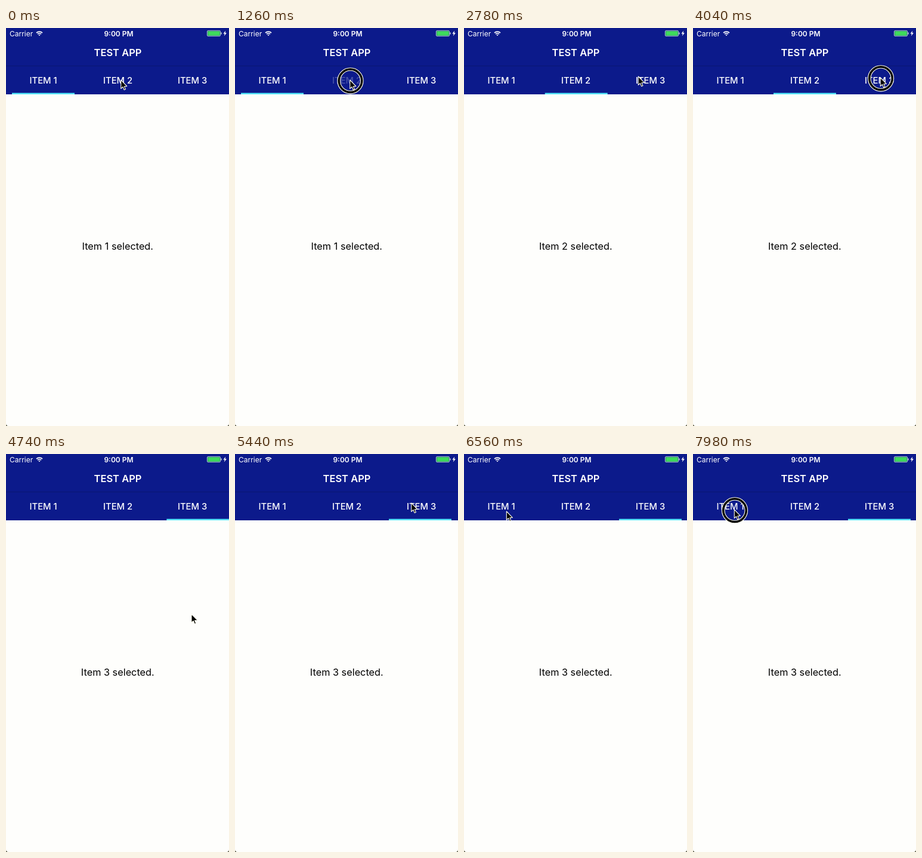
These frames come from a looping animation (374x666 px, 8 s). An HTML page with a canvas:

```html
<!DOCTYPE html>
<html lang="en">
<head>
<meta charset="utf-8">
<title>Tab bar</title>
<style>
html, body { margin: 0; width: 100%; height: 100%; overflow: hidden; background: #fefefc; }
canvas { display: block; }
</style>
</head>
<body>
<canvas id="stage" width="374" height="666"></canvas>
<script>
const ctx = document.getElementById('stage').getContext('2d');
const W = 374, H = 666, LOOP = 8000, BAR = 111, TAB = 125;
const BLUE = '#0c1a8b', LINE = '#0a1672', PAPER = '#fefefc';
const CYAN = '#55e8fa', GREEN = '#3fdc5c', EDGE = '#fffff0';
const FONT = 'Inter, Roboto, sans-serif';

const presses = [
  { tab: 1, down: 1140, up: 1440 },
  { tab: 2, down: 4040, up: 4460 },
  { tab: 0, down: 7960, up: 8400 }
];

// pointer moves; bend swings the path down (or up if negative)
const moves = [
  { from: 1950, till: 2720, x: 292, y: 81, bend: 263 },
  { from: 2780, till: 3520, x: 314, y: 83, bend: 0 },
  { from: 4460, till: 5400, x: 295.5, y: 82, bend: 284 },
  { from: 6080, till: 6540, x: 71, y: 96, bend: -75 },
  { from: 7140, till: 7280, x: 65, y: 90, bend: 0 },
  { from: 7420, till: 7940, x: 69, y: 93, bend: 0 }
];

const mix = (a, b, u) => a + (b - a) * u;
const progress = (t, from, till) => Math.max(0, Math.min(1, (t - from) / (till - from)));
const ease = u => u < 0.5 ? 2 * u * u : 1 - 2 * (1 - u) * (1 - u);

function spring(ms) {
  const s = Math.max(0, ms) / 1000, w = Math.PI / 0.4, decay = 3.72;
  return 1 - Math.exp(-decay * s) * (Math.cos(w * s) + decay / w * Math.sin(w * s));
}

function pointerAt(t) {
  let x = 192.5, y = 87;
  for (const m of moves) {
    const u = progress(t, m.from, m.till);
    x = mix(x, m.x, ease(u));
    y = mix(y, m.y, ease(u)) + m.bend * Math.sin(Math.PI * u) ** 2;
  }
  return [x, y];
}

function tabAlpha(tab, t) {
  const p = presses.find(q => q.tab === tab);
  if (!p) return 1;
  return t < p.up
    ? mix(1, 0.2, ease(progress(t, p.down, p.down + 150)))
    : mix(0.2, 1, ease(progress(t, p.up, p.up + 250)));
}

function text(str, x, y, size, weight, color, align = 'center') {
  ctx.font = `${weight} ${size}px ${FONT}`;
  ctx.textAlign = align;
  ctx.fillStyle = color;
  ctx.fillText(str, x, y);
}

function rect(x, y, w, h, color) {
  ctx.fillStyle = color;
  ctx.fillRect(x, y, w, h);
}

function arc(x, y, r, width, color, a = 0, b = Math.PI * 2) {
  ctx.beginPath();
  ctx.arc(x, y, r, a, b);
  ctx.lineWidth = width;
  ctx.strokeStyle = color;
  ctx.stroke();
}

function drawStatus() {
  text('Carrier', 6, 13.5, 12, 400, '#fff', 'left');
  text('9:00 PM', 189, 13.5, 12, 600, '#fff');

  // wifi
  for (let r = 1.3; r < 8; r += 2.9) {
    arc(56, 13.2, r, 1.7, '#fff', -Math.PI * 0.75, -Math.PI * 0.25);
  }

  // battery
  ctx.lineWidth = 0.8;
  ctx.strokeStyle = '#d5f0dc';
  ctx.beginPath();
  ctx.roundRect(337.4, 4.4, 22.2, 9.2, 1.6);
  ctx.stroke();
  rect(338.3, 5.3, 20.4, 7.4, GREEN);
  rect(360.4, 7.4, 1.3, 3.2, '#d5f0dc');
  ctx.fillStyle = '#fff';
  ctx.fill(new Path2D('M368.3 4.4L364.4 9.6H366.8L365.8 13.6L370 8.2H367.5Z'));
}

function drawCorners() {
  ctx.fillStyle = '#3a3a20';
  for (const [x, dir] of [[0, 1], [W, -1]]) {
    ctx.beginPath();
    ctx.moveTo(x, H - 4);
    ctx.quadraticCurveTo(x, H, x + 4 * dir, H);
    ctx.lineTo(x, H);
    ctx.fill();
  }
}

const arrow = new Path2D('M.3 0V14.4L3.5 11.5L5.7 16.6L8 15.6L5.9 10.7L10.3 10.4Z');

function drawPointer(x, y, pressed) {
  ctx.save();
  ctx.translate(x, y);
  if (pressed) {
    arc(1, 1.3, 19.3, 5, '#000');
    arc(1, 1.3, 21.6, 1.1, EDGE);
    arc(1, 1.3, 17, 1.1, EDGE);
  }
  ctx.fillStyle = '#000';
  ctx.fill(arrow);
  ctx.lineWidth = 1.1;
  ctx.lineJoin = 'round';
  ctx.strokeStyle = EDGE;
  ctx.stroke(arrow);
  ctx.restore();
}

function draw(t) {
  let tab = 0, barX = 10;
  for (const p of presses.filter(p => t >= p.up)) {
    barX += (p.tab - tab) * TAB * spring(t - p.up);
    tab = p.tab;
  }

  rect(0, 0, W, H, PAPER);
  rect(0, 0, W, BAR, BLUE);
  rect(0, 63, W, 1, LINE);
  drawStatus();
  text('TEST APP', 187.5, 47, 16.5, 600, '#fff');

  rect(barX, BAR - 2.4, 105, 2.4, CYAN);
  for (let i = 0; i < 3; i++) {
    ctx.globalAlpha = tabAlpha(i, t);
    text('ITEM ' + (i + 1), 62.6 + i * TAB, 93, 14.8, 500, '#fff');
  }
  ctx.globalAlpha = 1;

  text(`Item ${tab + 1} selected.`, 187.3, 370.5, 16.3, 400, '#000');
  drawCorners();
  drawPointer(...pointerAt(t), presses.some(p => t >= p.down && t < p.up));
}

const start = performance.now();
function tick() {
  draw((performance.now() - start) % LOOP);
  requestAnimationFrame(tick);
}
tick();
</script>
</body>
</html>
```
